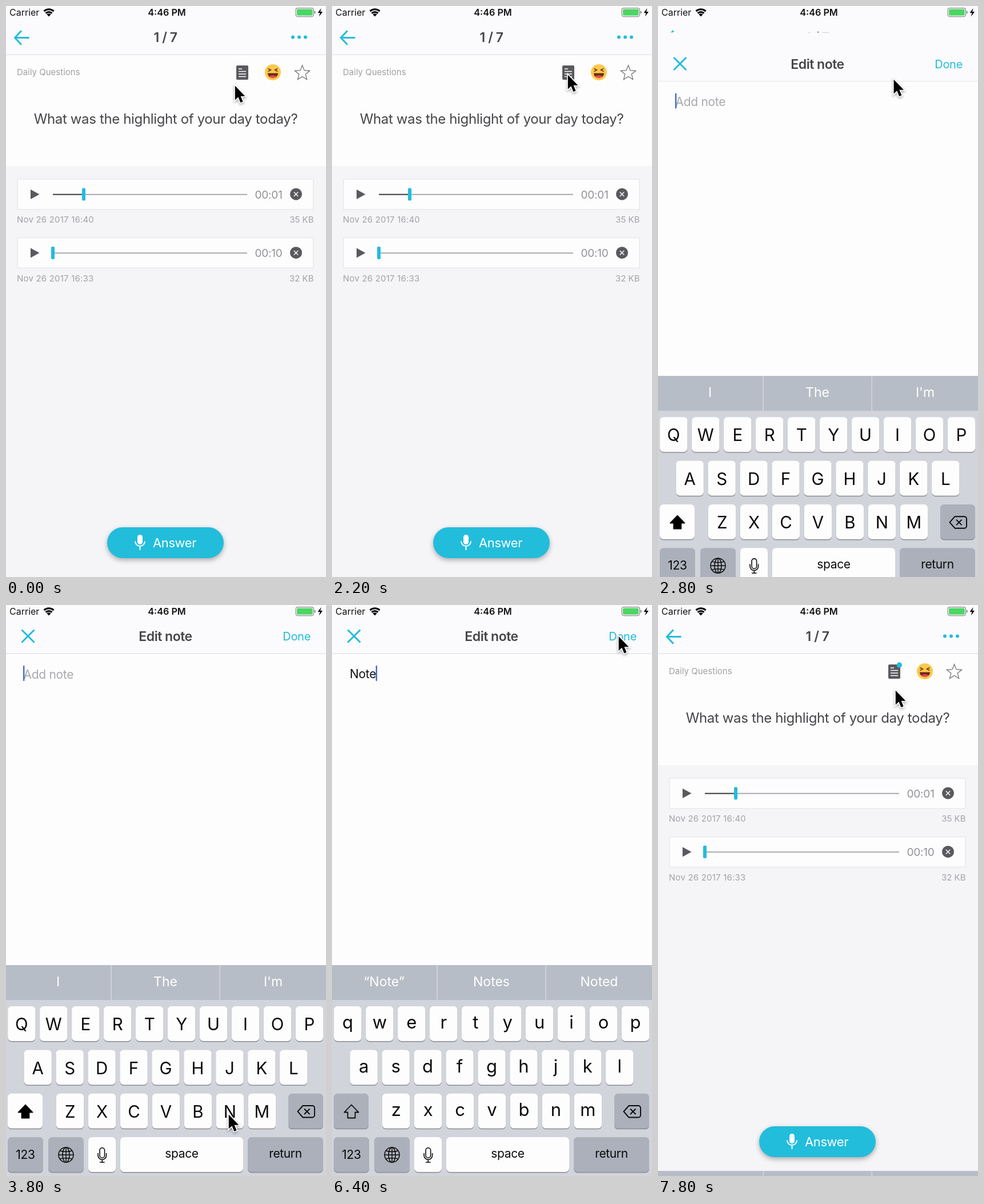
Write an HTML page with a canvas that moves like this. It is 560x999 px and loops after 8000 ms.

```html
<!DOCTYPE html>
<html lang="en">
<head>
<meta charset="utf-8">
<title>Edit note</title>
<style>
  html, body { margin: 0; width: 100%; height: 100%; overflow: hidden; background: #f5f4f7; }
  canvas { display: block; width: 560px; height: 999px; }
</style>
</head>
<body>
<canvas id="stage"></canvas>
<script>
const W = 560, H = 999, LOOP = 8000;
const CYAN = '#22bddb', DARK = '#5a595d', INK = '#454448', WHITE = '#fefdfe';
const canvas = document.getElementById('stage');
const ratio = window.devicePixelRatio || 1;
canvas.width = W * ratio;
canvas.height = H * ratio;
const c = canvas.getContext('2d');

// Drawing helpers
function text(s, x, y, size, color, { align = 'left', weight = 400, gap = 0 } = {}) {
  c.font = `${weight} ${size}px Inter, "Open Sans", sans-serif`;
  c.letterSpacing = gap + 'px';
  c.textAlign = align;
  c.fillStyle = color;
  c.fillText(s, x, y);
}
function rect(x, y, w, h, color, radius = 0) {
  c.fillStyle = color;
  c.beginPath();
  c.roundRect(x, y, w, h, radius);
  c.fill();
}
function disc(x, y, r, color) {
  c.fillStyle = color;
  c.beginPath();
  c.arc(x, y, r, 0, 7);
  c.fill();
}
function stroke(d, color, width, cap = 'butt') {
  c.strokeStyle = color;
  c.lineWidth = width;
  c.lineCap = cap;
  c.stroke(new Path2D(d));
}
function fill(d, color) {
  c.fillStyle = color;
  c.fill(new Path2D(d));
}
function at(x, y, draw) {
  c.save();
  c.translate(x, y);
  draw();
  c.restore();
}

// Timing: critically damped spring, and cursor stops as [ms, x, y]
function spring(t, start, speed) {
  const k = Math.max(0, t - start) / 1000 * speed;
  const p = 1 - (1 + k) * Math.exp(-k);
  return p > 0.998 ? 1 : p;
}
const cursorStops = [
  [0, 400, 138], [200, 400, 138], [1200, 431, 131], [1500, 431, 131], [2100, 412, 119],
  [2750, 412, 119], [3600, 389, 890], [4100, 389, 890], [4650, 472, 736], [4950, 472, 736],
  [5300, 249, 735], [5500, 249, 735], [5700, 140, 735], [6000, 489, 49], [6600, 505, 55],
  [7200, 523, 57], [7400, 523, 57], [7800, 415, 148], [8000, 415, 148]
];
function cursorAt(t) {
  const i = cursorStops.findIndex(s => s[0] > t);
  const [t0, x0, y0] = cursorStops[i - 1], [t1, x1, y1] = cursorStops[i];
  const u = (t - t0) / (t1 - t0), e = u * u * (3 - 2 * u);
  return [x0 + (x1 - x0) * e, y0 + (y1 - y0) * e];
}
const typing = [
  { from: 0, note: '', words: ['I', 'The', "I'm"] },
  { from: 4000, note: 'N', words: ['“N”', 'No', 'Not'] },
  { from: 4800, note: 'No', words: ['“No”', 'Not', 'Now'] },
  { from: 5480, note: 'Not', words: ['“Not”', 'Note', 'Nothing'] },
  { from: 5720, note: 'Note', words: ['“Note”', 'Notes', 'Noted'] }
];

function statusBar() {
  text('Carrier', 6, 17, 16, '#111');
  text('4:46 PM', 281.5, 17, 16.2, '#111', { align: 'center', weight: 600 });
  stroke('M66.5 9.2A12.5 12.5 0 0 1 83.5 9.2M69.5 12.6A8 8 0 0 1 80.5 12.6', '#000', 3);
  fill('M75 18.5L71.3 14.6A5.5 5.5 0 0 1 78.7 14.6Z', '#000');
  c.strokeStyle = '#8c8b8f';
  c.lineWidth = 1.2;
  c.beginPath();
  c.roundRect(507.2, 3.6, 31.2, 15, 3.5);
  c.stroke();
  rect(509, 5.4, 27.6, 11.4, '#4cd663', 2);
  rect(539.6, 8.6, 2, 5, '#8c8b8f', 1);
  fill('M551.5 4L545.5 12H549.5L547.8 18.5L554 10H550Z', '#000');
}

function headerBar() {
  rect(0, 0, W, 85, '#fbfafd');
  rect(0, 84.6, W, 1.2, '#e3e2e6');
}

function laughingFace() {
  disc(0, 0, 14, '#fdc94c');
  stroke('M-8.5 -6.5L-3.5 -4L-8.5 -1.5M8.5 -6.5L3.5 -4L8.5 -1.5', '#65371b', 1.5);
  fill('M-9 1.5H9C9 12.5 -9 12.5 -9 1.5Z', '#6b2c1a');
  fill('M-6.5 7.5C-3.5 4.5 3.5 4.5 6.5 7.5C3 10.5 -3 10.5 -6.5 7.5Z', '#e8474f');
}

function star(cx, cy) {
  let d = '';
  for (let i = 0; i < 10; i++) {
    const r = i % 2 ? 6 : 13.8, a = i * Math.PI / 5;
    d += (i ? 'L' : 'M') + (cx + r * Math.sin(a)) + ' ' + (cy - r * Math.cos(a));
  }
  stroke(d + 'Z', '#737277', 1.3);
}

function recording(y, progress, length, date, size) {
  rect(19.5, y - 27, 519, 54, '#e6e5e9');
  rect(20.8, y - 25.7, 516.4, 51.4, WHITE);
  fill(`M43 ${y - 8.5}L58.5 ${y}L43 ${y + 8.5}Z`, DARK);
  rect(82, y - 0.8, 340, 2, '#aaa9ae');
  rect(82, y - 0.8, progress, 2, '#48474b');
  rect(79 + progress, y - 11, 6, 22, CYAN, 2);
  text(length, 435.5, y + 7, 19, '#919095', { gap: -0.2 });
  disc(507.5, y - 0.3, 10.5, DARK);
  stroke(`M503.8 ${y - 4}l7.4 7.4m0 -7.4l-7.4 7.4`, '#fff', 1.4);
  text(date, 19, y + 49.5, 15, '#a3a2a7', { gap: 0.2 });
  text(size, 538.5, y + 49.5, 15, '#a3a2a7', { align: 'right' });
}

function answerButton() {
  c.save();
  c.shadowColor = 'rgba(0,0,0,.3)';
  c.shadowBlur = 8 * ratio;
  c.shadowOffsetY = 3.5 * ratio;
  rect(177, 912, 204, 54, CYAN, 27);
  c.restore();
  rect(230, 925, 9, 17, '#fff', 4.5);
  stroke('M226 936.5a8.5 8.5 0 0 0 17 0M234.5 945V952', '#fff', 2);
  text('Answer', 257, 947, 22, '#fff', { gap: -0.4 });
}

function questionPage(hasNote) {
  rect(0, 0, W, H, '#f5f4f7');
  rect(0, 85, W, 195, WHITE);
  headerBar();
  stroke('M40.5 55.5H16M27 43.2L15.5 55.5L27 67.8', CYAN, 3);
  text('1 / 7', 279, 63, 23, INK, { align: 'center', weight: 600, gap: -0.5 });
  for (const x of [502, 513, 524]) disc(x, 54.5, 3, CYAN);
  text('Daily Questions', 19, 121, 15, '#a09fa4');
  rect(403, 104, 21, 25, DARK, 2);
  stroke('M407 110h6M407 114.5h13M407 119h13M407 123.5h13', '#fff', 1.5);
  if (hasNote) disc(422.3, 105, 4.7, CYAN);
  at(467, 116, laughingFace);
  star(518.5, 117.5);
  text('What was the highlight of your day today?', 279.5, 206, 24, INK, { align: 'center', gap: -0.36 });
  recording(329.5, 54, '00:01', 'Nov 26 2017 16:40', '35 KB');
  recording(432, 0, '00:10', 'Nov 26 2017 16:33', '32 KB');
  answerButton();
}

function noteSheet(note) {
  rect(0, 0, W, H, WHITE);
  headerBar();
  stroke('M27.5 43.5L49.5 65.5M49.5 43.5L27.5 65.5', CYAN, 3);
  text('Edit note', 279, 63, 23, INK, { align: 'center', weight: 600, gap: -0.5 });
  text('Done', 533, 62, 20, CYAN, { align: 'right', gap: -0.3 });
  const style = { gap: -0.3 };
  if (note) text(note, 31, 127.5, 21, '#111', style);
  else text('Add note', 30.5, 128.5, 21, '#a9a8ad', style);
  const caret = note ? 30.5 + c.measureText(note).width : 30;
  rect(caret, 106, 2.4, 27, '#416bcd', 1);
}

function key(x, y, w, special) {
  rect(x, y + 1.5, w, 61, '#8a8c92', 6.5);
  rect(x, y, w, 61, special ? '#abb0bb' : WHITE, 6.5);
}

function keyboard(words, caps) {
  rect(0, 630, W, 400, '#d1d4db');
  rect(0, 630, W, 61, '#b7bdc6');
  for (const x of [183.5, 373.5]) rect(x, 630, 1.4, 61, '#d6d9df');
  words.forEach((word, i) => text(word, [91, 279, 467.5][i], 667, 23, '#fff', { align: 'center' }));

  [['qwertyuiop', 3.2, 702], ['asdfghjkl', 31.5, 778.5], ['zxcvbnm', 88, 854.8]].forEach(([row, left, y]) => {
    [...row].forEach((letter, i) => {
      const x = left + 55.95 * i;
      key(x, y, 48.3);
      if (caps) text(letter.toUpperCase(), x + 24.2, y + 42, 29.5, '#0a0a0a', { align: 'center' });
      else text(letter, x + 24.2, y + 39, 31, '#0a0a0a', { align: 'center' });
    });
  });

  key(3, 854.8, 61, !caps);
  const arrow = 'M34 874.5L46.5 887.5H40.5V897.5H27.5V887.5H21.5Z';
  c.lineJoin = 'round';
  if (caps) fill(arrow, '#000');
  stroke(arrow, '#0a0a0a', 1.8);
  key(494, 854.8, 61, true);
  stroke('M519.5 876H536a4 4 0 0 1 4 4V892.5a4 4 0 0 1 -4 4H519.5L510.5 886.2ZM522 881.5l9.5 9.5m0 -9.5l-9.5 9.5', '#0a0a0a', 1.9);
  c.lineJoin = 'miter';

  key(3, 931, 62, true);
  key(74, 931, 62, true);
  key(144, 931, 48);
  key(200, 931, 215);
  key(423, 931, 132, true);
  const label = { align: 'center', gap: -0.35 };
  text('123', 34, 969, 21, '#0a0a0a', label);
  text('space', 307.5, 967, 21, '#0a0a0a', label);
  text('return', 489, 967, 21, '#0a0a0a', label);
  at(105, 962, () => {
    c.strokeStyle = '#0a0a0a';
    c.lineWidth = 1.5;
    for (const rx of [13, 6]) {
      c.beginPath();
      c.ellipse(0, 0, rx, 13, 0, 0, 7);
      c.stroke();
    }
    stroke('M0 -13V13M-13 0H13M-10.5 -7Q0 -4 10.5 -7M-10.5 7Q0 4 10.5 7', '#0a0a0a', 1.4);
  });
  stroke('M164 954a4.3 4.3 0 0 1 8.6 0V963a4.3 4.3 0 0 1 -8.6 0ZM161 959V963a7.3 7.3 0 0 0 14.6 0V959M168.3 970.5V975M164 975H172.6', '#0a0a0a', 1.6);
}

function cursor([x, y]) {
  at(x + 0.8, y + 1.5, () => {
    const d = 'M0 0V25L5.6 19.8L9.6 29.5L13.8 27.7L9.8 18.2H17.6Z';
    c.save();
    c.shadowColor = 'rgba(0,0,0,.35)';
    c.shadowBlur = 4 * ratio;
    c.shadowOffsetY = 2 * ratio;
    stroke(d, '#fff', 3.2);
    c.restore();
    fill(d, '#000');
  });
}

function render(t) {
  c.setTransform(ratio, 0, 0, ratio, 0, 0);
  const { note, words } = typing.findLast(step => step.from <= t);
  const open = spring(t, 2362, 11);
  const sheet = open - spring(t, 6700, 11);
  const board = open - spring(t, 7398, 14);
  questionPage(t >= 6700);
  if (sheet > 0) at(0, H * (1 - sheet), () => noteSheet(note));
  if (board > 0) at(0, 369 * (1 - board), () => keyboard(words, !note));
  statusBar();
  cursor(cursorAt(t));
}

const start = performance.now();
function frame() {
  render((performance.now() - start) % LOOP);
  requestAnimationFrame(frame);
}
frame();
</script>
</body>
</html>
```
